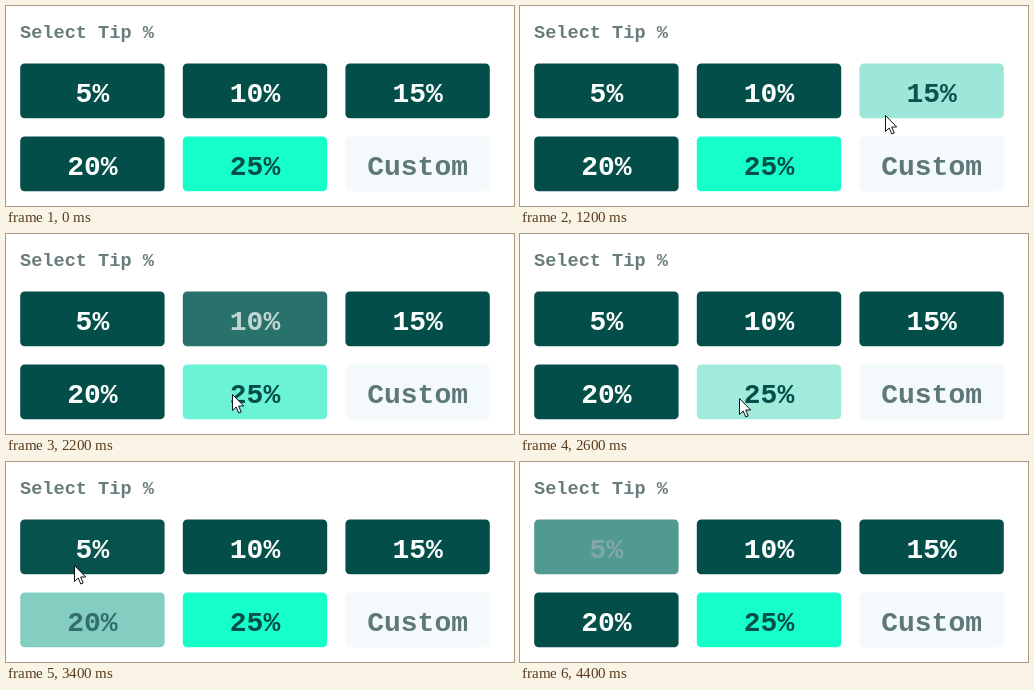
An HTML page with a canvas for the animation above (4500 ms loop, 508 by 200 pixels).

```html
<!DOCTYPE html>
<html lang="en">
<head>
<meta charset="utf-8">
<title>Tip selector</title>
<style>
  html, body { margin: 0; width: 508px; height: 200px; overflow: hidden; background: #fff; }
  canvas { display: block; }
</style>
</head>
<body>
<canvas id="stage" width="508" height="200"></canvas>
<script>
const ctx = document.getElementById('stage').getContext('2d');
const LOOP = 4500, STEP = 100, FADE = 500;
const FONT = '"Liberation Mono", monospace';
const BOX = { w: 144.4, h: 54.8, r: 4.5 };

const DARK = [4, 78, 73], WHITE = [250, 253, 252];
const HOVER = [161, 235, 220], MINT = [22, 255, 201];
const PALE = [244, 250, 251], GREY = [94, 119, 120];

// Pointer stops: time, x, y
const stops = [
  [0, 402, 218], [100, 397, 185], [500, 386, 172], [600, 386, 170],
  [850, 375, 98], [1200, 365, 109], [1450, 265, 95], [1900, 236, 90],
  [2050, 232, 140], [2200, 226, 160], [2680, 217, 165], [3000, 74, 160],
  [3250, 70, 158], [3450, 67, 85], [3700, 66, 77], [4220, 67, 80], [4400, 74, -40]
];

const mix = (a, b, p) => a + (b - a) * p;
const blend = (a, b, p) => `rgb(${a.map((v, i) => Math.round(mix(v, b[i], p)))})`;
const bezier = (a, b, s) => 3 * a * s * (1 - s) ** 2 + 3 * b * s * s * (1 - s) + s ** 3;

// CSS "ease" curve
function ease(x) {
  if (x <= 0) return 0;
  if (x >= 1) return 1;
  let lo = 0, hi = 1;
  for (let i = 0; i < 20; i++) {
    const mid = (lo + hi) / 2;
    if (bezier(.25, .25, mid) < x) lo = mid; else hi = mid;
  }
  return bezier(.1, 1, lo);
}

function pointerAt(t) {
  const i = stops.findIndex(s => s[0] > t);
  if (i < 0) return stops[stops.length - 1].slice(1);
  const [t0, x0, y0] = stops[i - 1], [t1, x1, y1] = stops[i];
  const p = (t - t0) / (t1 - t0);
  return [mix(x0, x1, p), mix(y0, y1, p)];
}

function makeButton(label, i) {
  const x = 14.2 + 162.6 * (i % 3), y = 57.4 + 73 * Math.floor(i / 3);
  const fill = label === '25%' ? MINT : label === 'Custom' ? PALE : DARK;
  const ink = fill === MINT ? DARK : fill === PALE ? GREY : WHITE;
  let enter = Infinity, leave = Infinity;
  // One visit per button: find when the pointer is over it
  for (let t = 0; t < LOOP; t += 5) {
    const [px, py] = pointerAt(t);
    if (px < x || px > x + BOX.w || py < y || py > y + BOX.h) continue;
    enter = Math.min(enter, t);
    leave = t;
  }
  return { label, x, y, fill, ink, enter, leave };
}
const buttons = ['5%', '10%', '15%', '20%', '25%', 'Custom'].map(makeButton);

function text(str, x, y, size, align, color) {
  ctx.font = `bold ${size}px ${FONT}`;
  ctx.textAlign = align;
  ctx.fillStyle = color;
  ctx.fillText(str, x, y);
}

function drawButton(b, t) {
  const p = ease((t - b.enter) / FADE) * (1 - ease((t - b.leave) / FADE));
  ctx.fillStyle = blend(b.fill, HOVER, p);
  ctx.beginPath();
  ctx.roundRect(b.x, b.y, BOX.w, BOX.h, BOX.r);
  ctx.fill();
  text(b.label, b.x + BOX.w / 2, b.y + 38.6, 28, 'center', blend(b.ink, DARK, p));
}

function drawPointer(x, y) {
  ctx.save();
  ctx.translate(Math.round(x) + .5, Math.round(y) + .5);
  const arrow = new Path2D('M0 0V16L3.7 12.5 6.3 18.5 8.7 17.5 6.2 11.5H11.2Z');
  ctx.fillStyle = '#fff';
  ctx.fill(arrow);
  ctx.strokeStyle = '#111';
  ctx.stroke(arrow);
  ctx.restore();
}

function draw(t) {
  ctx.fillStyle = '#fff';
  ctx.fillRect(0, 0, 508, 200);
  text('Select Tip %', 14, 32, 18.6, 'left', '#687c7b');
  buttons.forEach(b => drawButton(b, t));
  drawPointer(...pointerAt(t));
}

const start = performance.now();
function tick() {
  const t = (performance.now() - start) % LOOP;
  draw(Math.floor(t / STEP) * STEP);
  requestAnimationFrame(tick);
}
tick();
</script>
</body>
</html>
```
